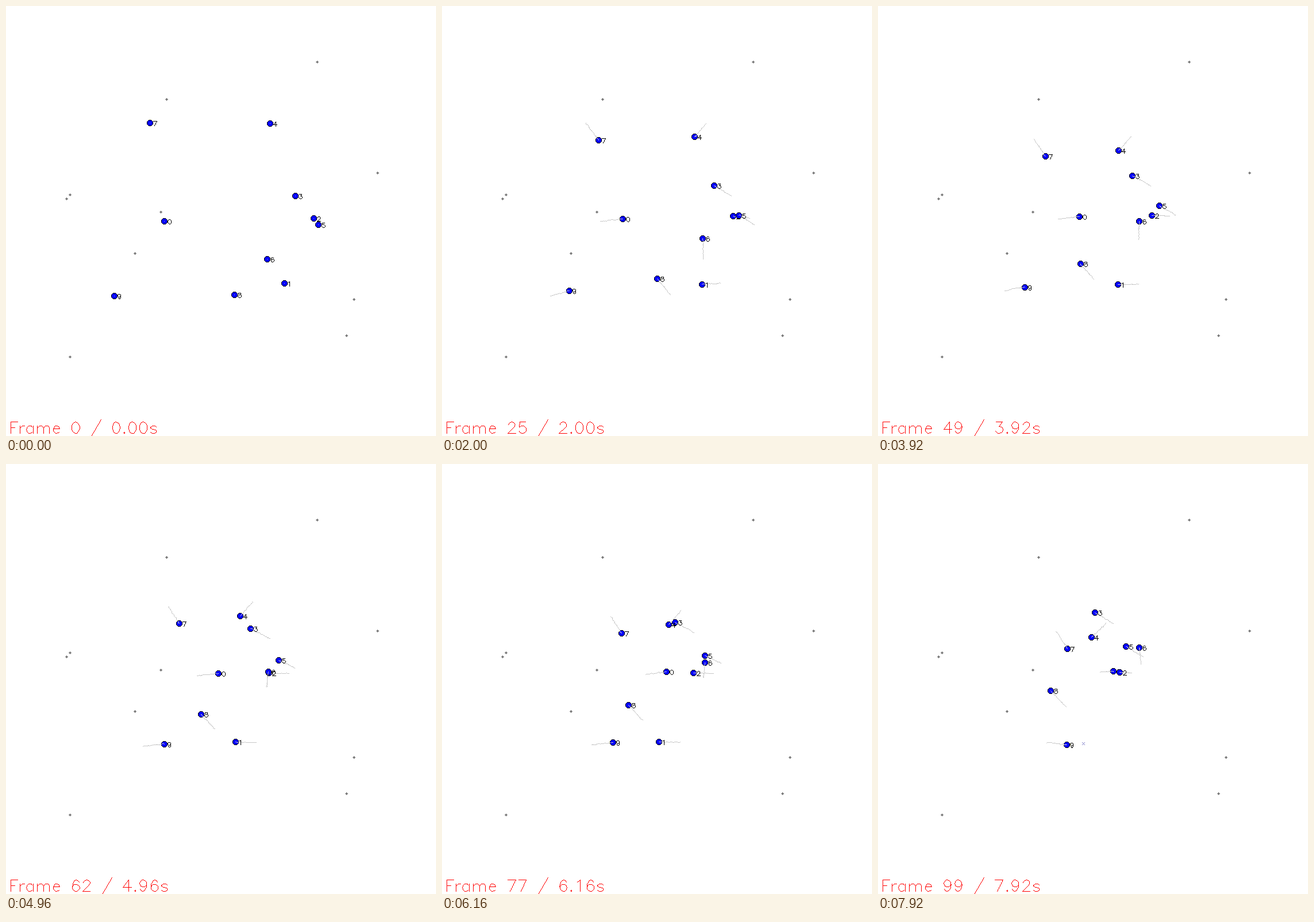
A matplotlib script that plays this animation: 748x748 px, repeating every 8000 ms.

```python
import numpy as np
import matplotlib.pyplot as plt
from matplotlib.animation import FuncAnimation
from matplotlib.patches import PathPatch
from matplotlib.path import Path

SIZE, FRAMES, STEP_MS = 748, 100, 80
TRAIL = 25      # frames of history behind each walker
EXIT = 89       # last frame of the walker that leaves
KEYS = (0, 36, 77, 99)

fig = plt.figure(figsize=(SIZE / 100, SIZE / 100), dpi=100, facecolor="white")
ax = fig.add_axes([0, 0, 1, 1])
ax.set(xlim=(0, SIZE), ylim=(SIZE, 0))
ax.axis("off")


# --- crisp one-pixel drawing ------------------------------------------------
SQUARE = np.array([(0, 0), (1, 0), (1, 1), (0, 1), (0, 0)])
SQUARE_CODES = [Path.MOVETO, Path.LINETO, Path.LINETO, Path.LINETO, Path.CLOSEPOLY]


def pixel_path(pixels):
    pixels = np.unique(pixels, axis=0)
    squares = (pixels[:, None] + SQUARE).reshape(-1, 2)
    return Path(squares, SQUARE_CODES * len(pixels))


def layer(color, zorder, pixels=((0, 0),)):
    patch = PathPatch(pixel_path(np.array(pixels)), fc=color, lw=0, snap=False, zorder=zorder)
    return ax.add_patch(patch)


def line_pixels(points):
    """Pixels of a polyline, one per step along the longer axis."""
    points = np.rint(points)
    parts = [points[:1]]
    for a, b in zip(points, points[1:]):
        steps = int(np.abs(b - a).max())
        parts.append(np.rint(np.linspace(a, b, steps + 1)))
    return np.vstack(parts)


# --- stroke font: y goes up from the baseline -------------------------------
def arc(cx, cy, rx, ry, start=0, end=360):
    a = np.radians(np.linspace(start, end, 2 + abs(end - start) // 25))
    return list(zip(cx + rx * np.cos(a), cy + ry * np.sin(a)))


def turned(strokes):
    return [[(20 - x, 21 - y) for x, y in s] for s in strokes]


def arch(x):
    return [(x, 10)] + arc(x + 6, 9, 5, 5, 120, 0) + [(x + 11, 0)]


SIX = [arc(11, 8, 7, 13, 45, 180), arc(10.5, 6.5, 6.5, 6.5)]

GLYPHS = {  # advance width, strokes
    " ": (16, []),
    ".": (10, [arc(5, 1, 1, 1)]),
    "/": (22, [[(20, 25), (2, -7)]]),
    "0": (20, [arc(10, 10.5, 7, 10.5)]),
    "1": (20, [[(6, 17), (8, 18), (11, 21), (11, 0)]]),
    "2": (20, [arc(10, 15, 6, 6, 170, -40) + [(3, 0), (17, 0)]]),
    "3": (20, [[(5, 21), (16, 21), (10, 13)] + arc(10, 6.5, 7, 6.5, 80, -155)]),
    "4": (20, [[(13, 0), (13, 21), (3, 7), (18, 7)]]),
    "5": (20, [[(15, 21), (5, 21), (4, 12)] + arc(10, 7, 7, 7, 130, -155)]),
    "6": (20, SIX),
    "7": (20, [[(3, 21), (17, 21), (7, 0)]]),
    "8": (20, [arc(10, 17, 6, 4), arc(10, 6.5, 7, 6.5)]),
    "9": (20, turned(SIX)),
    "F": (17, [[(4, 0), (4, 21), (17, 21)], [(4, 11), (12, 11)]]),
    "r": (13, [[(4, 0), (4, 14)], arc(11, 7, 7, 7, 170, 80)]),
    "a": (19, [[(15, 14), (15, 0)], arc(9, 7, 6, 7, 40, 320)]),
    "m": (30, [[(4, 14), (4, 0)], arch(4), arch(15)]),
    "e": (18, [[(3, 8)] + arc(9, 7, 6, 7, 10, 320)]),
    "s": (17, [arc(8.5, 10.5, 5.5, 3.5, 20, 270) + arc(8.5, 3.5, 5.5, 3.5, 90, -160)]),
}


def text_pixels(text, x, y, scale):
    parts = []
    for char in text:
        width, strokes = GLYPHS[char]
        parts += [line_pixels(np.array(s) * (scale, -scale) + (x, y)) for s in strokes]
        x += width * scale
    return np.vstack(parts)


# --- walkers ----------------------------------------------------------------
grid = np.stack(np.meshgrid(np.arange(-5, 6), np.arange(-5, 6)), -1).reshape(-1, 2)
reach = (grid ** 2).sum(axis=1)
DISC = grid[reach < 25]
RING = grid[(reach >= 25) & (reach < 30)]
DIAMOND = grid[np.abs(grid).sum(axis=1) <= 2]
CROSS = grid[(np.abs(grid[:, 0]) == np.abs(grid[:, 1])) & (reach <= 8)]

rng = np.random.default_rng(4)


class Walker:
    def __init__(self, number, waypoints, last=KEYS[-1]):
        self.number, self.last = str(number), last
        frames = np.arange(FRAMES)
        keys = KEYS[:-1] + (last,)
        path = np.column_stack([np.interp(frames, keys, c) for c in zip(*waypoints)])
        wobble = rng.normal(0, 0.4, path.shape)
        wobble[list(keys)] = 0
        self.path = np.rint(path + wobble)
        colors = ("#0000ff", "black", "#c8c8c8", "black")
        self.layers = [layer(c, 10 + number + i / 10) for i, c in enumerate(colors)]

    def draw(self, frame):
        here = frame <= self.last
        x, y = spot = self.path[frame]
        trail = line_pixels(self.path[max(0, frame - TRAIL):frame + 1])
        label = text_pixels(self.number, x + 5, y + 5, 0.4)
        for patch, pixels in zip(self.layers, (DISC + spot, RING + spot, trail, label)):
            patch.set_visible(here)
            patch.set_path(pixel_path(pixels))


ROUTES = [
    [(275, 374), (331, 368), (390, 361), (409, 360)],
    [(484, 482), (437, 484), (377, 483), (357, 486)],
    [(535, 369), (493, 364), (437, 363), (420, 362)],
    [(503, 330), (460, 304), (405, 275), (377, 258)],
    [(459, 204), (430, 238), (394, 279), (371, 301)],
    [(543, 380), (504, 355), (457, 333), (431, 317)],
    [(454, 440), (453, 388), (457, 345), (454, 319)],
    [(250, 203), (281, 246), (312, 294), (329, 321)],
    [(397, 502), (364, 462), (324, 419), (300, 394)],
    [(188, 504), (236, 491), (297, 484), (328, 488)],
]
LEAVER = 1
walkers = [Walker(n, route, EXIT if n == LEAVER else KEYS[-1]) for n, route in enumerate(ROUTES)]

# --- fixed marks, exit cross and caption ------------------------------------
for mark in [(541, 97), (279, 162), (646, 290), (111, 328), (105, 335),
             (269, 358), (224, 430), (605, 510), (592, 573), (111, 610)]:
    layer("#7f7f7f", 2, DIAMOND + mark)

cross = layer("#8080c8", 3, CROSS + ROUTES[LEAVER][-1])
caption = layer("#ff0000", 60)


def draw(frame):
    for walker in walkers:
        walker.draw(frame)
    cross.set_visible(frame > EXIT)
    text = f"Frame {frame} / {frame * STEP_MS / 1000:.2f}s"
    caption.set_path(pixel_path(text_pixels(text, 4, 743, 0.95)))
    return []


anim = FuncAnimation(fig, draw, frames=FRAMES, init_func=lambda: draw(0),
                     interval=STEP_MS, repeat=True)
plt.show()
```
